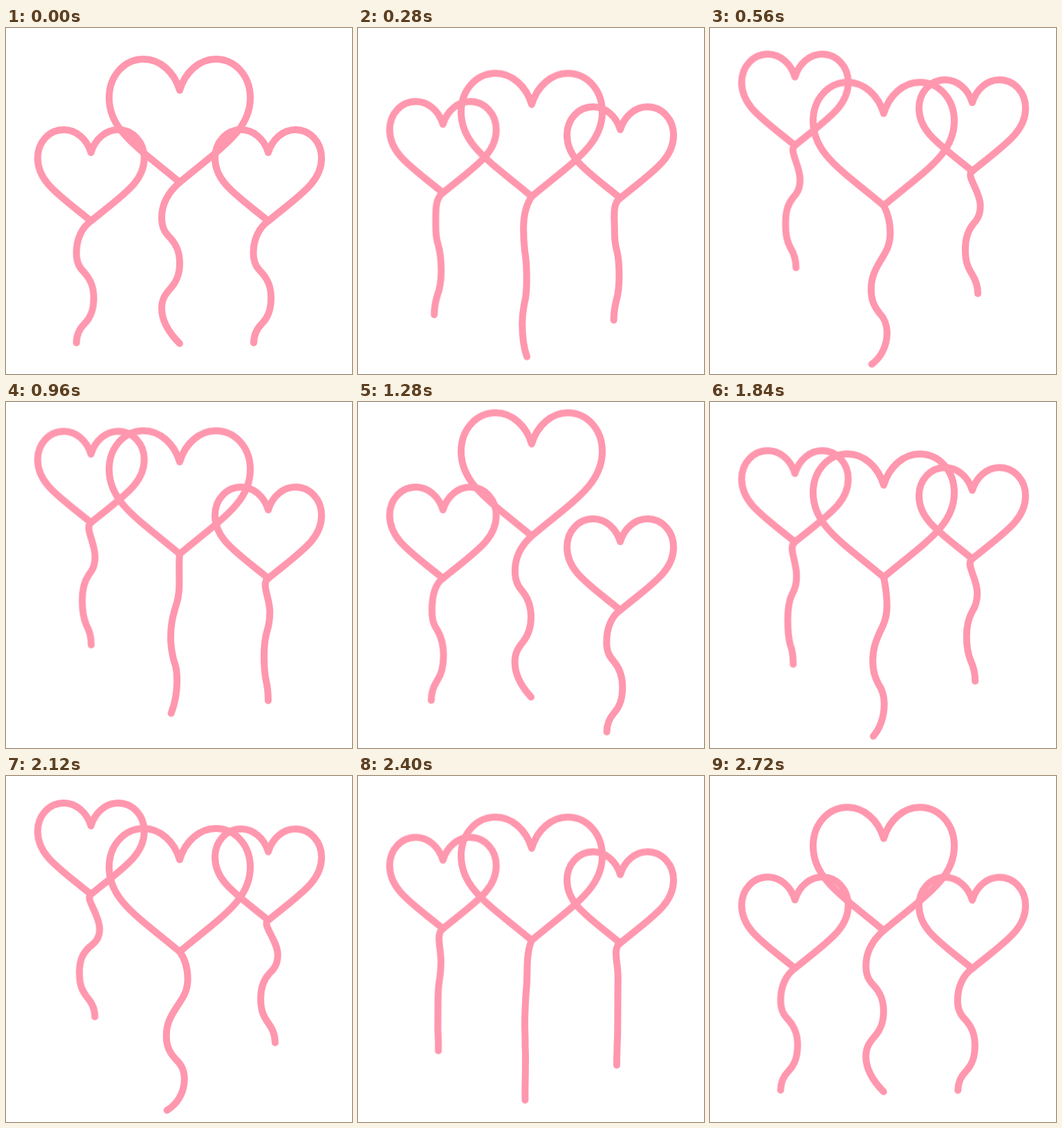
An HTML page for the animation above (2760 ms loop, 500 by 500 pixels).

```html
<!DOCTYPE html>
<html lang="en">
<head>
<meta charset="utf-8">
<title>Heart balloons</title>
<style>
html, body { margin: 0; width: 100%; height: 100%; overflow: hidden; background: #fff; }
svg { display: block; width: 100%; height: 100%; }
path { fill: none; stroke: #ff97ae; stroke-width: 10; stroke-linecap: round; stroke-linejoin: round; }

.balloon, .string {
  animation: 2760ms cubic-bezier(.333, 0, .667, 1) infinite;
}
.string { d: var(--rest); animation-name: sway; }

.left { animation-name: float-left; }
.left .string {
  --rest: path("M0 99C-13 108 -21 125 -21 145C-21 160 -16 167 -9 174C-1 183 4 193 4 210C4 229 -1 239 -9 247C-15 253 -21 261 -21 275");
  --bent: path("M0 99C-9 105 13 128 13 149C13 163 6 169 -2 175C-12 184 -17 194 -17 212C-17 230 -13 238 -6 247C1 255 6 263 6 276");
  animation-name: sway-left;
}

.middle { animation-name: float-middle; }
.middle .string {
  --rest: path("M0 133C-15 146 -26 163 -26 184C-26 201 -19 208 -13 214C-5 223 0 233 0 250C0 267 -5 277 -13 286C-20 294 -26 301 -26 315C-26 332 -16 350 0 366");
  --bent: path("M0 133C6 140 13 152 13 172C13 191 4 201 -4 213C-13 226 -20 237 -20 255C-20 272 -13 281 -6 288C3 296 8 304 8 317C8 338 -4 354 -19 362");
}

.right { animation-name: float-right; }
.right .string {
  --rest: path("M0 99C-13 108 -21.5 125 -21.5 145C-21.5 160 -16 167 -9 174C-1 183 4 193 4 210C4 229 -1 239 -9 247C-15 253 -21 261 -21 275");
  --bent: path("M0 99C-10 105 15 128 15 149C15 163 9 170 2 176C-6 184 -11.5 194 -11.5 212C-11.5 230 -7 238 0 247C6 255 11 263 11 276");
}

@keyframes float-left {
  0%, 100% { transform: translate(122.7px, 180px); }
  27.4% { transform: translate(122.7px, 49px); }
  52.6% { transform: translate(122.7px, 175px); }
  75.1% { transform: translate(122.7px, 70.5px); }
}
@keyframes float-middle {
  0%, 100% { transform: translate(251px, 90px); }
  18.1% { transform: translate(251px, 124.5px); }
  48% { transform: translate(251px, 60px); }
  70.5% { transform: translate(251px, 125px); }
}
@keyframes float-right {
  0%, 100% { transform: translate(379px, 180px); }
  21.7% { transform: translate(379px, 107px); }
  47.5% { transform: translate(379px, 202.3px); }
  74.7% { transform: translate(379px, 108px); }
}
@keyframes sway {
  0%, 49.7%, 100% { d: var(--rest); }
  25%, 73.9% { d: var(--bent); }
}
@keyframes sway-left {
  0%, 52.6%, 100% { d: var(--rest); }
  27.4%, 75.1% { d: var(--bent); }
}
</style>
</head>
<body>
<svg viewBox="0 0 500 500">
  <defs>
    <path id="small" d="M0 0C-6 -20 -22 -33 -39 -33C-60.5 -33 -77 -15 -77 8C-77 43 -46 61 0 99C46 61 77 43 77 8C77 -15 60.5 -33 39 -33C22 -33 6 -20 0 0Z"/>
    <path id="big" d="M0 0C-8 -27 -29 -45 -52 -45C-80 -45 -102 -21 -102 11C-102 58 -61 82 0 133C61 82 102 58 102 11C102 -21 80 -45 52 -45C29 -45 8 -27 0 0Z"/>
  </defs>
  <g class="balloon left"><use href="#small"/><path class="string"/></g>
  <g class="balloon middle"><use href="#big"/><path class="string"/></g>
  <g class="balloon right"><use href="#small"/><path class="string"/></g>
</svg>
</body>
</html>
```
